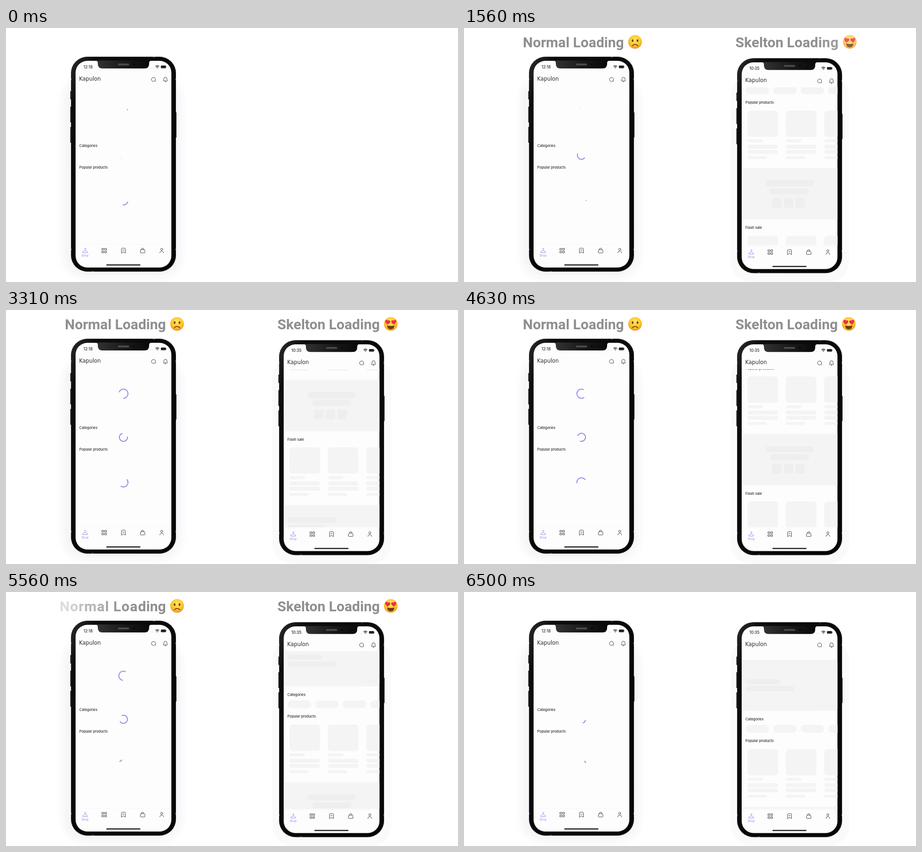
Write an HTML page that moves like this. It is 960x540 px and loops after 6.56 s.

```html
<!DOCTYPE html>
<html lang="en">
<head>
<meta charset="utf-8">
<title>Normal and skeleton loading</title>
<style>
  html, body { margin: 0; width: 100%; height: 100%; overflow: hidden; background: #fff; }
  svg { display: block; width: 960px; height: 540px; }
  text { font-family: Inter, Roboto, sans-serif; fill: #2b2b2f; }
  .label { font-size: 7.35px; font-weight: 500; }
  .clock { font-size: 8.3px; font-weight: 500; }
  .brand { font: 11.4px "DejaVu Sans", sans-serif; }
  .title text { font: 700 30px Roboto, sans-serif; fill: #8f8f8f; }
  .line { fill: none; stroke: #45454b; stroke-width: 1; stroke-linecap: round; stroke-linejoin: round; }
  .spin { fill: none; stroke: #9a8be6; stroke-width: 2; }
</style>
</head>
<body>
<svg viewBox="0 0 960 540">
  <defs>
    <filter id="soft" x="-30%" y="-20%" width="160%" height="140%"><feGaussianBlur stdDeviation="9"/></filter>
    <linearGradient id="body" x1="0" y1="0" x2="1" y2="1">
      <stop offset="0" stop-color="#2c2c2c"/><stop offset=".12" stop-color="#0c0c0c"/><stop offset="1" stop-color="#050505"/>
    </linearGradient>
    <linearGradient id="notch"><stop offset="0" stop-color="#343434"/><stop offset=".5" stop-color="#1a1a1a"/><stop offset="1" stop-color="#080808"/></linearGradient>
    <radialGradient id="face" cx=".5" cy=".35" r=".68">
      <stop offset="0" stop-color="#ffe468"/><stop offset=".6" stop-color="#fdc62d"/><stop offset="1" stop-color="#ee8b26"/>
    </radialGradient>
    <clipPath id="view"><rect x="590" y="126" width="203.4" height="335.5"/></clipPath>

    <g id="phone">
      <g fill="#111">
        <rect x="136.6" y="134" width="4" height="18" rx="1"/>
        <rect x="136.6" y="167" width="4" height="34" rx="1"/>
        <rect x="136.6" y="210" width="4" height="34" rx="1"/>
        <rect x="358" y="179" width="4" height="54" rx="1"/>
      </g>
      <rect x="138" y="61" width="223" height="457" rx="35" fill="url(#body)"/>
      <rect x="138.7" y="61.7" width="221.6" height="455.6" rx="34.3" fill="none" stroke="#2a2a2a" stroke-width=".8"/>
      <path d="M138.7 107v4M360.3 107v4M138.7 469v4M360.3 469v4M312 61.8h4M182 517.2h4" stroke="#6a6a6a" stroke-width="1.2"/>
      <rect x="147.8" y="69.8" width="203.4" height="439.4" rx="25" fill="#fdfdfd"/>
      <path d="M190 69h119q-5 1-5 5v2q0 10-10 10h-89q-10 0-10-10v-2q0-4-5-5z" fill="url(#notch)"/>
      <rect x="237.5" y="75.6" width="24" height="3.8" rx="1.9" fill="#4b4b4b"/>
      <circle cx="271.7" cy="77.3" r="2" fill="#070709"/>
      <path d="M306 85h8" stroke="#cfcfcf" stroke-width="1" stroke-dasharray="1 1.3"/>
      <path d="M317.4 81.4q3.9-3.2 7.8 0M318.9 83.2q2.4-2 4.8 0" fill="none" stroke="#222" stroke-width="1.3"/>
      <circle cx="321.3" cy="84.9" r=".9" fill="#222"/>
      <rect x="328.9" y="79.8" width="10.8" height="5.6" rx="1.5" fill="#222"/>
      <path d="M340.7 81.6v2" stroke="#777" stroke-width=".9"/>
      <text class="brand" x="155.2" y="111.6">Kapulon</text>
      <g class="line">
        <path d="M316.4 112.4a4.3 4.3 0 1 1 .4-.5l.9 1.5"/>
        <path d="M334.4 111.8q1-1.2 1-4a3.2 3.2 0 0 1 6.4 0q0 2.800 1 4q.3.700-.5.700h-7.400q-.8 0-.5-.7zM337.400 114.400h2.400"/>
      </g>
      <path d="M148 460.5h203" stroke="#f7f7f7"/>
      <g class="line">
        <path d="M166.600 469.800a1.500 1.500 0 1 1 1.700 1.500v1.300l4.600 3q1.200 2-1 2h-8q-2.200 0-1-2l5.400-3" stroke="#9a8be6"/>
        <path d="M204 468.500h3.400v3.400h-3.400zM210 468.500h3.400v3.400h-3.400zM204 474.600h3.400v3.400h-3.400zM210 474.600h3.400v3.400h-3.400z"/>
        <path d="M245.200 478.600v-9q0-1.500 1.500-1.500h5.400q1.500 0 1.500 1.500v9l-4.200-2.600zM247.700 472.200h3.400"/>
        <path d="M287 471.200h6.400q1 0 1.200 1l.6 4.600q0 1.400-1.400 1.400h-7.200q-1.400 0-1.400-1.400l.6-4.600q.2-1 1.200-1zM287.600 471q0-3 2.600-3t2.600 3"/>
        <circle cx="330.700" cy="470.500" r="2.200"/><path d="M326.800 478.200q0-3.800 3.900-3.800t3.900 3.800"/>
      </g>
      <text x="167.700" y="486.200" text-anchor="middle" style="font-size:6.2px;fill:#9a8be6">Shop</text>
      <rect x="213" y="502.600" width="72.500" height="2.400" rx="1.200" fill="#222"/>
    </g>
  </defs>

  <rect x="122" y="105" width="250" height="425" rx="45" fill="#f4f4f7" filter="url(#soft)"/>
  <use href="#phone"/>
  <text class="clock" x="164.500" y="85.800">12:18</text>
  <text class="label" x="155.800" y="252.500">Categories</text>
  <text class="label" x="155.800" y="299.300">Popular products</text>
  <g id="spinners"></g>

  <g id="right">
    <rect x="566" y="102" width="252" height="437" rx="42" fill="#fafafa"/>
    <use href="#phone" x="442" y="3.200"/>
    <text class="clock" x="606" y="89">10:35</text>
    <g clip-path="url(#view)"><g id="list"></g></g>
  </g>
  <g class="title" id="sad"></g>
  <g class="title" id="love"></g>
</svg>
<script>
const LOOP = 6560, VIDEO = 5050;
const $ = id => document.getElementById(id);
const clamp = v => Math.max(0, Math.min(1, v));

function add(parent, tag, attrs, content = '') {
  const el = document.createElementNS('http://www.w3.org/2000/svg', tag);
  for (const k in attrs) el.setAttribute(k, attrs[k]);
  el.innerHTML = content;
  return parent.appendChild(el);
}

// Skeleton page
const list = $('list');
const box = (x, y, width, height, rx, fill = '#f4f4f4') => add(list, 'rect', { x, y, width, height, rx, fill });
const bar = (x, y, w, h) => box(x, y, w, h, h / 2, '#eeeeee');
const label = (y, s) => add(list, 'text', { class: 'label', x: 597.8, y }, s);

function products(y) {
  for (let i = 0; i < 3; i++) {
    const x = 602 + i * 81.5;
    box(x, y, 65, 56, 7);
    [[61, 33, 6.5], [72.5, 65, 8.5], [83.5, 65, 8.5], [97, 41, 6]]
      .forEach(([dy, w, h]) => box(x, y + dy, w, h, h / 2));
  }
}

box(590, 127, 203.5, 108.5, 6);
bar(598, 168.5, 73, 10.5);
bar(598, 182.8, 104, 11);
for (let i = 0; i < 4; i++) bar(762.5 + i * 6.4, 223, 3.6, 3.6);
label(255.6, 'Categories');
for (let i = 0; i < 4; i++) box(598 + i * 58.5, 265.5, 50, 16.5, 8.2);
label(302.4, 'Popular products');
products(317);
box(590, 439.5, 203.5, 109, 0);
bar(640, 465, 103, 13);
bar(650, 482.3, 83, 12.5);
for (let i = 0; i < 3; i++) box(654.5 + i * 24.8, 503, 20, 20.5, 3, '#eeeeee');
label(568.8, 'Flash sale');
products(583);
box(590, 706, 203.5, 109, 0);
bar(598, 731, 104, 12.5);
bar(598, 748, 81, 12);

// Titles, one element per letter
const faces = {
  sad: '<ellipse cx="-5.200" cy="-2.800" rx="1.900" ry="2.700"/><ellipse cx="5.200" cy="-2.800" rx="1.900" ry="2.700"/>' +
    '<path d="M-6 8.300Q0 2.600 6 8.300" fill="none" stroke="#6b3d0e" stroke-width="1.700" stroke-linecap="round"/>',
  love: '<path d="M-7.800 3.200Q0 5.600 7.800 3.200Q7 11.500 0 11.500T-7.800 3.200z"/>' + [-6.5, 6.5].map(x =>
    `<path transform="translate(${x} -4) rotate(${-x * 1.5})" fill="#ee2f45" d="M0 5.500C-9 0-5-6.500 0-3C5-6.500 9 0 0 5.500z"/>`).join('')
};

function title(id, words, x, faceX, start, end) {
  const ctx = document.createElement('canvas').getContext('2d');
  ctx.font = '700 30px Roboto, sans-serif';
  const parts = [...words].map((c, i) =>
    add($(id), 'text', { x: x + ctx.measureText(words.slice(0, i + 1)).width - ctx.measureText(c).width, y: 41 }, c));
  parts.push(add(add($(id), 'g', {}), 'g', { transform: `translate(${faceX} 29.500)`, fill: '#6b3d0e' },
    '<circle r="14.500" fill="url(#face)"/>' + faces[id]).parentNode);
  return t => parts.forEach((el, i) => {
    const enter = 1 - (1 - clamp((t - start - i * 24) / 300)) ** 2;
    const leave = clamp((t - end - i * 24) / 300);
    el.setAttribute('transform', `translate(${12 * (1 - enter) - 13 * leave} 0)`);
    el.setAttribute('opacity', enter * (1 - leave * leave));
  });
}
const titles = [
  title('sad', 'Normal Loading', 125, 363.3, 25, 5310),
  title('love', 'Skelton Loading', 576.5, 817.2, 1030, 5800)
];

// Indeterminate progress rings: centre y, radius, stroke phase, rotation in degrees
const rings = [[178, 9.7, .86, 82], [270.700, 8.6, .035, 214], [366.500, 9.7, .72, 213]]
  .map(r => [add($('spinners'), 'path', { class: 'spin' }), ...r]);

// cubic-bezier(.4, 0, .2, 1)
function ease(x) {
  x = clamp(x);
  let lo = 0, hi = 1, s;
  for (let i = 0; i < 20; i++) {
    s = (lo + hi) / 2;
    if (1.2 * s * (1 - s) ** 2 + .6 * s * s * (1 - s) + s ** 3 < x) lo = s; else hi = s;
  }
  return s * s * (3 - 2 * s);
}

function drawRing([el, cy, r, phase, turn], t) {
  const u = (phase + t / 1333) % 1;
  const head = ease(u * 2), tail = ease(u * 2 - 1);
  const from = -90 + 270 * tail + 90 * u + turn + 360 * t / 2222;
  const sweep = Math.max(270 * (head - tail), .1);
  const at = deg => {
    const a = deg * Math.PI / 180;
    return `${249.4 + r * Math.cos(a)} ${cy + r * Math.sin(a)}`;
  };
  el.setAttribute('d', `M${at(from)}A${r} ${r} 0 ${+(sweep > 180)} 1 ${at(from + sweep)}`);
}

// Scroll offset, smooth between keys without overshoot
const keys = [[0, 0], [1370, 0], [1500, 110], [1700, 190], [2190, 249], [2750, 280], [3310, 291],
  [3700, 291], [4190, 257], [4630, 176], [4880, 110], [5560, 35], [6500, -17], [6560, -18]];
const slope = i => (keys[i + 1][1] - keys[i][1]) / (keys[i + 1][0] - keys[i][0]);
function tangent(i) {
  if (i < 1 || i > keys.length - 2) return 0;
  const a = slope(i - 1), b = slope(i);
  return a * b > 0 ? 2 * a * b / (a + b) : 0;
}
function scrollAt(t) {
  let i = 0;
  while (i < keys.length - 2 && t >= keys[i + 1][0]) i++;
  const [t0, a] = keys[i], [t1, b] = keys[i + 1], d = t1 - t0, p = (t - t0) / d, q = 1 - p;
  return a * q * q * (1 + 2 * p) + b * p * p * (3 - 2 * p) + d * p * q * (tangent(i) * q - tangent(i + 1) * p);
}

function draw(t) {
  rings.forEach(r => drawRing(r, t % VIDEO));
  titles.forEach(f => f(t));
  $('right').setAttribute('opacity', clamp((t - 250) / 450));
  list.setAttribute('transform', `translate(0 ${-scrollAt(t)})`);
}

const begin = performance.now();
function frame() {
  draw((performance.now() - begin) % LOOP);
  requestAnimationFrame(frame);
}
frame();
</script>
</body>
</html>
```
